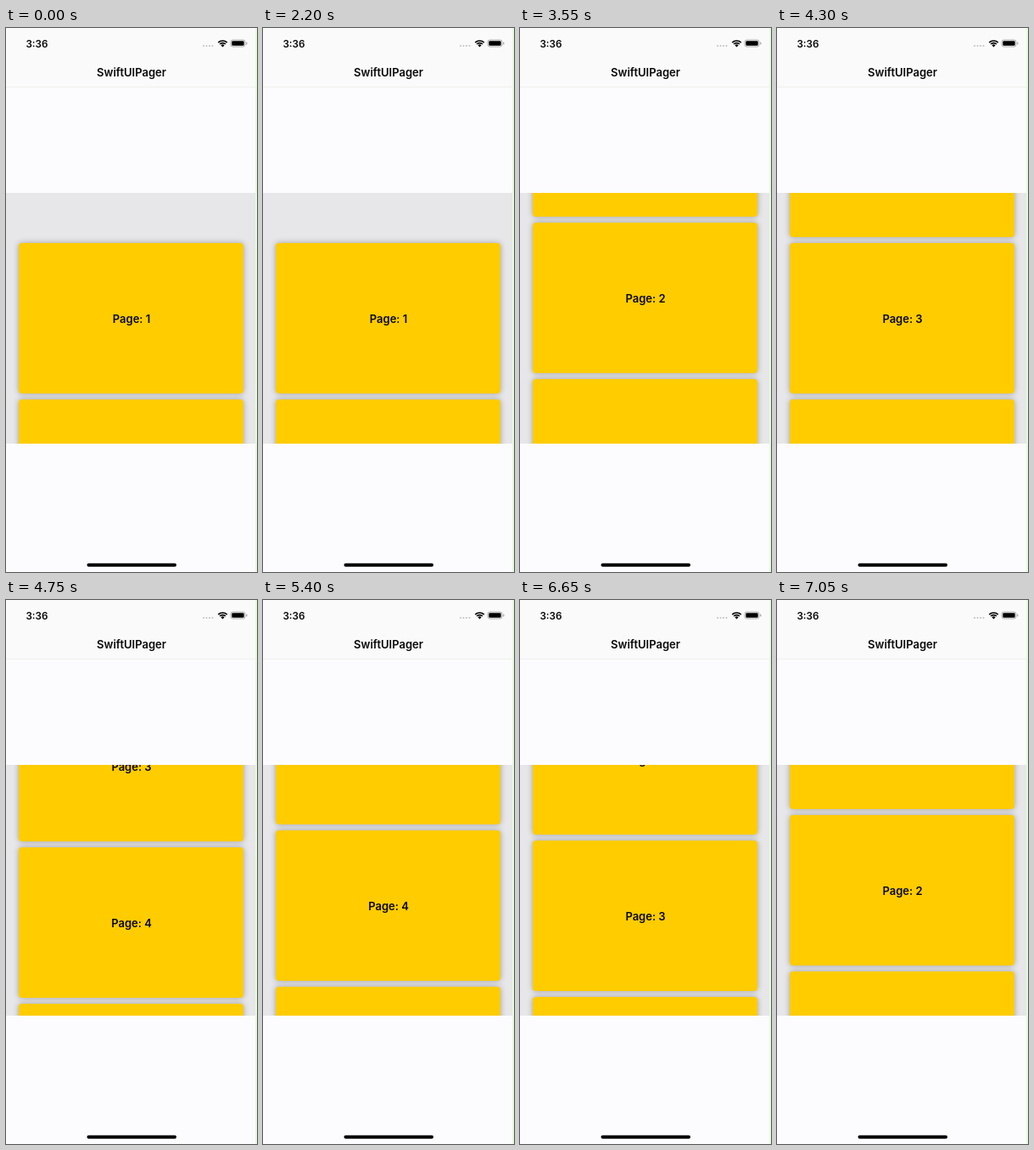
These frames come from a looping animation (296x640 px, 7100 ms). An HTML page with a canvas:

```html
<!DOCTYPE html>
<html lang="en">
<head>
<meta charset="utf-8">
<title>Vertical pager</title>
<style>
  html, body { margin: 0; width: 100%; height: 100%; overflow: hidden; background: #fcfcfe; }
  canvas { display: block; width: 296px; height: 640px; }
</style>
</head>
<body>
<canvas id="stage"></canvas>
<script>
const W = 296, H = 640, LOOP = 7100, STEP = 50;
const PITCH = 184, CARD = { x: 15, y: 253, w: 265, h: 177, r: 4 };
const VIEW = { y: 194, h: 295 };

// Each swipe: start time, duration, first page, last page
const swipes = [
  [2200, 550, 0, 1],
  [3300, 700, 1, 2],
  [4300, 600, 2, 3],
  [5200, 700, 3, 2],
  [6350, 700, 2, 1]
];

const canvas = document.getElementById('stage');
const ctx = canvas.getContext('2d');
const ratio = window.devicePixelRatio || 1;
canvas.width = W * ratio;
canvas.height = H * ratio;

// The finger drags for half the swipe, then the page eases into place.
function swipeProgress(t, duration) {
  const drag = ms => 24 / PITCH * Math.pow(ms / 250, 1.29);
  const release = duration / 2;
  if (t <= release) return drag(t);
  const x = Math.min(1, (t - release) / (duration - release));
  const d = drag(release);
  return d + (1 - d) * (1 - (1 - x) ** 2);
}

function pageAt(t) {
  let page = 0;
  for (const [start, duration, from, to] of swipes) {
    if (t >= start) page = from + (to - from) * swipeProgress(t - start, duration);
  }
  return page;
}

function rect(x, y, w, h, color) {
  ctx.fillStyle = color;
  ctx.fillRect(x, y, w, h);
}

function rounded(x, y, w, h, r, color) {
  ctx.beginPath();
  ctx.roundRect(x, y, w, h, r);
  ctx.fillStyle = color;
  ctx.fill();
}

function label(text, x, y, size, align) {
  ctx.font = `600 ${size}px Inter, sans-serif`;
  ctx.textAlign = align;
  ctx.fillStyle = '#080808';
  ctx.fillText(text, x, y);
}

function drawWifi(x, y) {
  const from = -Math.PI * 0.75, to = -Math.PI * 0.25;
  ctx.strokeStyle = ctx.fillStyle = '#000';
  ctx.lineWidth = 1.7;
  for (const r of [7.4, 4.8]) {
    ctx.beginPath();
    ctx.arc(x, y, r, from, to);
    ctx.stroke();
  }
  ctx.beginPath();
  ctx.moveTo(x, y);
  ctx.arc(x, y, 3, from, to);
  ctx.fill();
}

function drawBattery(x, y) {
  ctx.beginPath();
  ctx.roundRect(x + 0.5, y + 0.5, 17, 8, 2.5);
  ctx.strokeStyle = '#a4a4a4';
  ctx.lineWidth = 0.9;
  ctx.stroke();
  rounded(x + 1.8, y + 1.8, 14.4, 5.4, 1.3, '#000');
  rounded(x + 18.7, y + 3, 1.2, 3, 0.6, '#a4a4a4');
}

function drawHeader() {
  rect(0, 0, W, 70, '#fafafa');
  rect(0, 69, W, 1, '#f0f0ec');
  label('3:36', 23.4, 22.5, 11.7, 'left');
  for (let i = 0; i < 4; i++) rounded(232 + i * 3.5, 20, 2, 2, 1, '#c0c0c0');
  drawWifi(255.5, 22.4);
  drawBattery(264.5, 13.5);
  label('SwiftUIPager', 148, 56.5, 13, 'center');
}

function drawPager(page) {
  ctx.save();
  ctx.beginPath();
  ctx.rect(0, VIEW.y, 294, VIEW.h);
  ctx.clip();
  rect(0, VIEW.y, W, VIEW.h, '#e7e6e8');
  for (let i = 0; i < 6; i++) {
    const y = CARD.y + Math.round((i - page) * PITCH);
    if (y > VIEW.y + VIEW.h + 10 || y + CARD.h < VIEW.y - 10) continue;
    ctx.shadowColor = 'rgba(0, 0, 0, 0.3)';
    ctx.shadowBlur = 7 * ratio;
    rounded(CARD.x, y, CARD.w, CARD.h, CARD.r, '#ffcc00');
    ctx.shadowColor = 'transparent';
    label('Page: ' + (i + 1), 148, y + 93.5, 13, 'center');
  }
  ctx.restore();
}

function draw(now) {
  const t = Math.floor(now % LOOP / STEP) * STEP;
  ctx.setTransform(ratio, 0, 0, ratio, 0, 0);
  rect(0, 0, W, H, '#fcfcfe');
  drawHeader();
  drawPager(pageAt(t));
  rect(294, 0, 2, H, '#e2fddc');
  rounded(95.5, 629.8, 105.5, 3.9, 1.95, '#000');
}

const begin = performance.now();
function tick() {
  draw(performance.now() - begin);
  requestAnimationFrame(tick);
}
tick();
</script>
</body>
</html>
```
